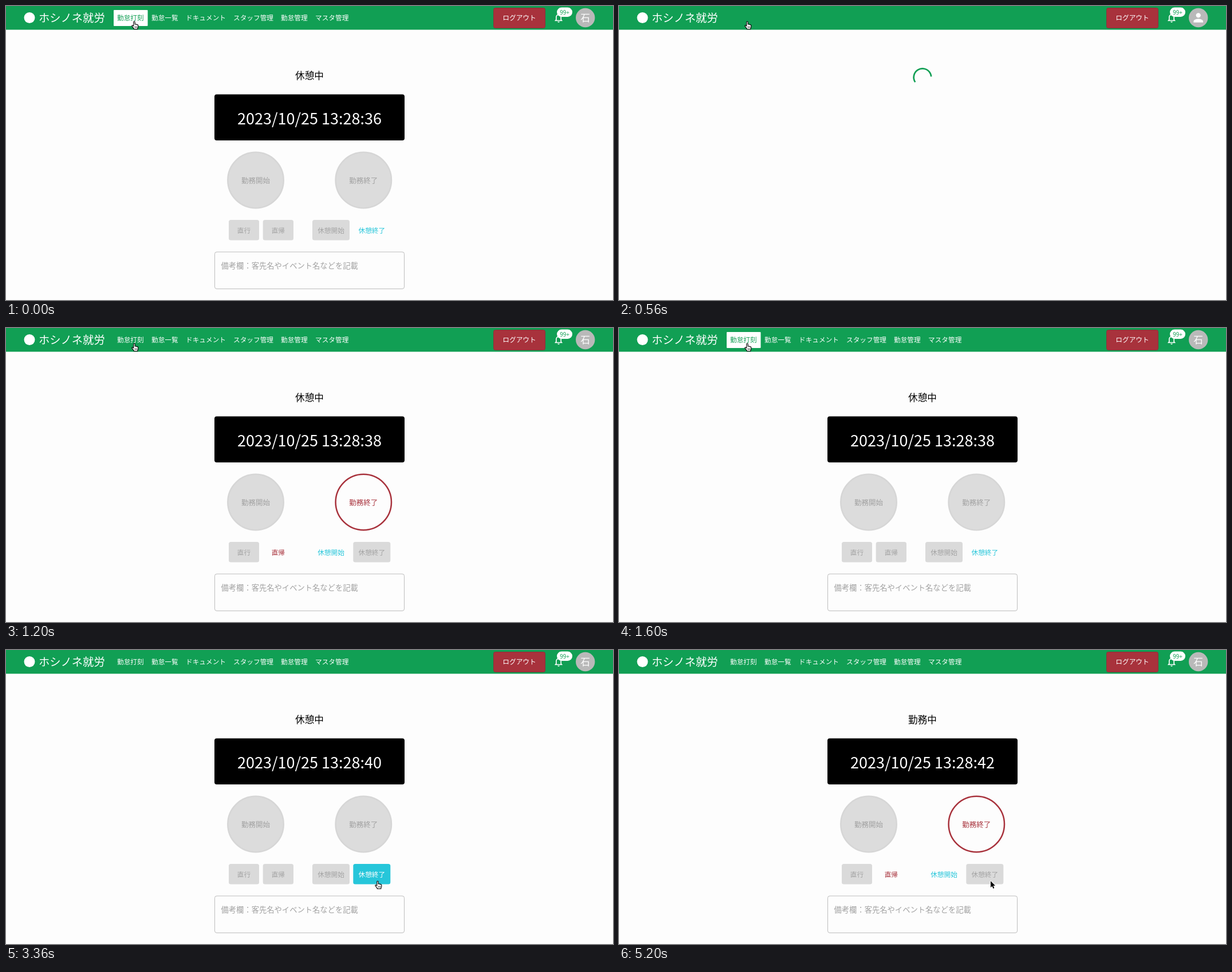
An HTML page with a canvas for the animation above (5280 ms loop, 1060 by 514 pixels).

```html
<!DOCTYPE html>
<html lang="ja">
<head>
<meta charset="utf-8">
<title>打刻</title>
<style>
html, body { margin: 0; width: 100%; height: 100%; overflow: hidden; background: #fdfdfd; }
canvas { display: block; width: 1060px; height: 514px; }
</style>
</head>
<body>
<canvas id="stage"></canvas>
<script>
const W = 1060, H = 514, LOOP = 5280;
const LOAD = 80, USER = 1040, READY = 1200, HOVER = 1280, PRESS = 2560, RESUME = 4800;
const GREEN = '#119f54', RED = '#a8323c', CYAN = '#26c6da', PAPER = '#fdfdfd';
const FONT = '"Noto Sans CJK JP", "Noto Sans CJK", "Noto Sans", sans-serif';

const canvas = document.getElementById('stage');
const ctx = canvas.getContext('2d');
const dpr = window.devicePixelRatio || 1;
canvas.width = W * dpr;
canvas.height = H * dpr;

const NAV = [['勤怠打刻', 194], ['勤怠一覧', 254], ['ドキュメント', 314],
  ['スタッフ管理', 397], ['勤怠管理', 480], ['マスタ管理', 540]];
// time, x, y of the pointer tip
const PATH = [[2040, 224, 27], [2160, 290, 78], [2320, 455, 215],
  [2480, 587, 326], [2560, 630, 383], [2720, 649, 404]];

const BELL = new Path2D('M12 22c1.1 0 2-.9 2-2h-4c0 1.1.9 2 2 2zm6-6v-5c0-3.07-1.63-5.64-4.5-6.32V4c0-.83-.67-1.5-1.5-1.5s-1.5.67-1.5 1.5v.68C7.64 5.36 6 7.92 6 11v5l-2 2v1h16v-1l-2-2zm-2 1H8v-6c0-2.48 1.51-4.5 4-4.5s4 2.02 4 4.5v6z');
const PERSON = new Path2D('M12 12c2.21 0 4-1.79 4-4s-1.79-4-4-4-4 1.79-4 4 1.79 4 4 4zm0 2c-2.67 0-8 1.34-8 4v2h16v-2c0-2.66-5.33-4-8-4z');
const ARROW = new Path2D('M0 0V11.2L2.6 8.8L4.4 13L6.3 12.2L4.5 8.1H8Z');
const HAND = new Path2D('M-1.2 1.2Q-1.2 0 0 0T1.2 1.2V5Q2.3 4.4 3.2 5.3Q4.4 4.8 5.1 5.9Q6.7 5.6 6.8 7V9.5Q6.6 11 5.8 12V13.5H-.8V12.3L-3.8 8.6Q-4.6 7.2 -3.4 6.9Q-2.4 6.8 -1.2 8.2Z');
const KNUCKLES = new Path2D('M1.2 8.5V11.5M3 8.5V11.5M4.8 8.5V11.5');

const clamp = v => Math.min(1, Math.max(0, v));

function bezier(x1, x2, y1, y2) {
  const at = (u, a, b) => 3 * u * (1 - u) * (1 - u) * a + 3 * u * u * (1 - u) * b + u * u * u;
  return x => {
    x = clamp(x);
    let lo = 0, hi = 1;
    for (let i = 0; i < 24; i++) {
      const mid = (lo + hi) / 2;
      if (at(mid, x1, x2) < x) lo = mid; else hi = mid;
    }
    return at((lo + hi) / 2, y1, y2);
  };
}
const easeInOut = bezier(0.42, 0.58, 0, 1);
const standard = bezier(0.4, 0.2, 0, 1);
const fade = (t, start) => standard((t - start) / 250);

function text(str, x, y, size, color, align = 'center', weight = 500) {
  ctx.font = `${weight} ${size}px ${FONT}`;
  ctx.textAlign = align;
  ctx.fillStyle = color;
  ctx.fillText(str, x, y + size * 0.375);
}

function box(x, y, w, h, r, fill, stroke) {
  ctx.beginPath();
  ctx.roundRect(x, y, w, h, r);
  if (fill) { ctx.fillStyle = fill; ctx.fill(); }
  if (stroke) { ctx.strokeStyle = stroke; ctx.lineWidth = 1; ctx.stroke(); }
}

function disc(x, y, r, fill, stroke) {
  ctx.beginPath();
  ctx.arc(x, y, r, 0, Math.PI * 2);
  if (fill) { ctx.fillStyle = fill; ctx.fill(); }
  if (stroke) { ctx.strokeStyle = stroke; ctx.lineWidth = 2.5; ctx.stroke(); }
}

function icon(path, x, y, scale) {
  ctx.save();
  ctx.translate(x - 12 * scale, y - 12 * scale);
  ctx.scale(scale, scale);
  ctx.fillStyle = '#fff';
  ctx.fill(path);
  ctx.restore();
}

function blend(alpha, draw) {
  if (alpha <= 0) return;
  ctx.save();
  ctx.globalAlpha = alpha;
  draw();
  ctx.restore();
}

// off: 0 enabled, 1 disabled
function roundButton(label, x, off) {
  blend(1 - off, () => {
    disc(x, 304.5, 48.7, PAPER, RED);
    text(label, x, 305, 12.5, RED);
  });
  blend(off, () => {
    disc(x, 304.5, 48.7, '#dcdcdc', '#d6d6d6');
    text(label, x, 305, 12.5, '#a0a0a0');
  });
}

function button(label, x, w, color, off, hover = 0) {
  const cx = x + w / 2;
  blend(1 - off, () => text(label, cx, 392.5, 11.67, color));
  blend((1 - off) * hover, () => {
    box(x, 374, w, 35.5, 3.5, color);
    text(label, cx, 392.5, 11.67, '#fff');
  });
  blend(off, () => {
    box(x, 374, w, 35.5, 3.5, '#dadada');
    text(label, cx, 392.5, 11.67, '#a3a3a3');
  });
}

function pointer(t) {
  if (t <= PATH[0][0]) return PATH[0].slice(1);
  for (let i = 1; i < PATH.length; i++) {
    const [t0, x0, y0] = PATH[i - 1], [t1, x1, y1] = PATH[i];
    if (t < t1) {
      const u = (t - t0) / (t1 - t0);
      return [x0 + (x1 - x0) * u, y0 + (y1 - y0) * u];
    }
  }
  return PATH[PATH.length - 1].slice(1);
}

function cursor(x, y, hand) {
  ctx.save();
  ctx.translate(x, y);
  ctx.lineJoin = 'round';
  ctx.lineWidth = hand ? 1.1 : 1.6;
  ctx.strokeStyle = hand ? '#000' : '#fff';
  ctx.fillStyle = hand ? '#fff' : '#000';
  const shape = hand ? HAND : ARROW;
  if (hand) ctx.fill(shape);
  ctx.stroke(shape);
  if (!hand) ctx.fill(shape);
  if (hand) { ctx.lineWidth = 0.7; ctx.stroke(KNUCKLES); }
  ctx.restore();
}

function header(t, onNav) {
  ctx.fillStyle = GREEN;
  ctx.fillRect(0, 0, W, 41.5);
  disc(41, 20.5, 9.5, '#fff');
  text('ホシノネ就労', 57, 20.5, 19.3, '#fff', 'left');

  const user = t < LOAD || t >= USER;
  if (user) {
    const lit = t < LOAD || (t >= HOVER && onNav);
    if (lit) box(188, 7, 59.5, 28, 1, '#fff');
    NAV.forEach(([label, x], i) =>
      text(label, x, 20.5, 11.67, lit && i === 0 ? GREEN : '#fff', 'left'));
  }

  box(851.5, 3.5, 90, 35, 3, RED, '#8d3036');
  text('ログアウト', 896.5, 21, 11.67, '#fff');
  icon(BELL, 965, 20.5, 0.833);
  box(962, 2.5, 27, 16.5, 8.25, '#fff');
  text('99+', 975.5, 11, 10, GREEN);
  disc(1011.7, 20.5, 16.7, '#b9b9b9');
  if (user) text('石', 1011.7, 21, 16.7, '#fff', 'center', 400);
  else icon(PERSON, 1011.7, 20.5, 1.04);
}

function spinner(ms) {
  if (ms <= 0) return;
  const p = ms / 1400 % 1, unit = 1 / 20.2;
  const a = easeInOut(p * 2), b = easeInOut(p * 2 - 1);
  const from = 15 * a + 110 * b;
  const to = Math.min(from + 1 + 99 * a, 126.9);
  const turn = p * Math.PI * 2;
  ctx.beginPath();
  ctx.arc(530, 124.7, 15.3, turn + from * unit, turn + to * unit);
  ctx.strokeStyle = GREEN;
  ctx.lineWidth = 2.7;
  ctx.stroke();
}

function page(t) {
  const working = t >= RESUME;
  const rest = t < LOAD ? 1 : working ? 1 - fade(t, RESUME) : fade(t, READY);
  const sec = 36 + Math.floor((t + 800) / 1000);

  text(working ? '勤務中' : '休憩中', 530, 122, 16.6, '#000');
  box(364, 154.5, 332, 80.5, 4, '#000');
  text(`2023/10/25 13:28:${sec}`, 530, 196.5, 27, '#fff', 'center', 400);

  roundButton('勤務開始', 436, 1);
  roundButton('勤務終了', 624.3, rest);
  button('直行', 389, 53, RED, 1);
  button('直帰', 448.7, 53.3, RED, rest);
  button('休憩開始', 535, 65, CYAN, rest);
  button('休憩終了', 606.3, 65, CYAN, 1 - rest, fade(t, PRESS));

  box(364.5, 430, 331, 64.5, 3.5, null, '#bdbdbd');
  text('備考欄：客先名やイベント名などを記載', 375.5, 454, 13.3, '#a2a2a2', 'left', 400);
}

function draw(t) {
  ctx.setTransform(dpr, 0, 0, dpr, 0, 0);
  ctx.fillStyle = PAPER;
  ctx.fillRect(0, 0, W, H);
  const [x, y] = pointer(t);
  const onNav = x < 247.5 && y < 35;
  header(t, onNav);
  if (t >= LOAD && t < READY) spinner(t - 112);
  else page(t);
  cursor(x, y, onNav || (t >= PRESS && t < RESUME));
}

const begin = performance.now();
function tick() {
  draw((performance.now() - begin) % LOOP);
  requestAnimationFrame(tick);
}
tick();
</script>
</body>
</html>
```
